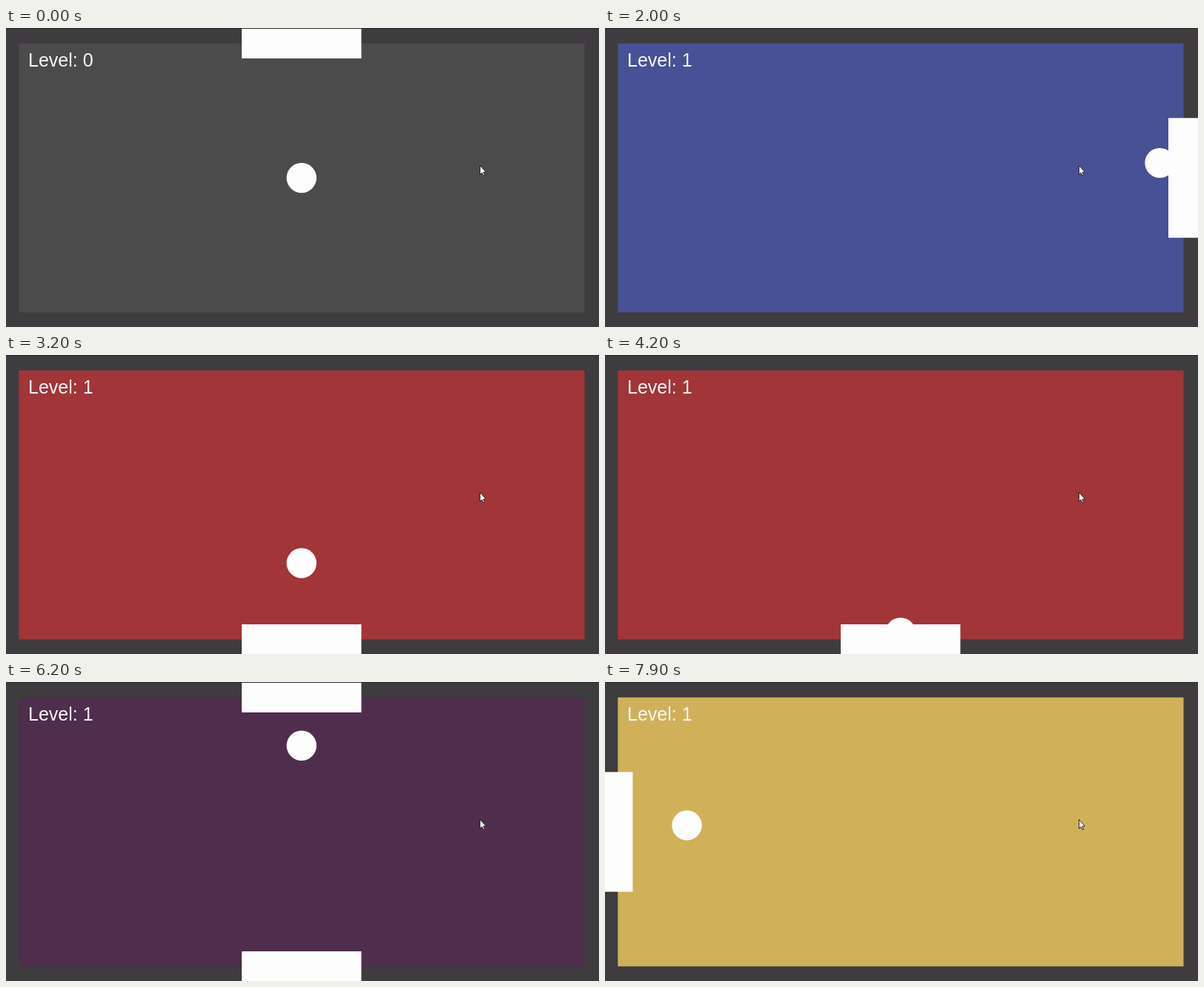
An HTML page with a canvas for the animation above (8000 ms loop, 800 by 403 pixels).

```html
<!DOCTYPE html>
<html lang="en">
<head>
<meta charset="utf-8">
<title>Rooms</title>
<style>
html, body { margin: 0; width: 100%; height: 100%; overflow: hidden; background: #3f3c3f; }
canvas { display: block; }
</style>
</head>
<body>
<canvas id="stage" width="800" height="403"></canvas>
<script>
const ctx = document.getElementById('stage').getContext('2d');
const LOOP = 8000;
const SPEED = 0.42; // px per ms
const CENTER = { x: 398.7, y: 202 };
const WALL = '#3f3c3f', WHITE = '#fdfdfd', GOLD = '#d0b15a';

// Unit steps: up, down, left, right
const STEP = { U: [0, -1], D: [0, 1], L: [-1, 0], R: [1, 0] };

// Keys read as "directions + ms"; a bare number is a pause.
// The ball enters beside the door named by "from", or at the centre.
const rooms = [
  { color: '#4b4b4b', doors: 'U', keys: '30 U420' },
  { color: '#485096', doors: 'R', keys: '718 UR48 R849' },
  { color: GOLD, doors: 'UDLR', from: 'L', keys: 'R610 UR160 U260' },
  { color: '#a13538', doors: 'D', from: 'D', keys: 'U388 213 D521' },
  { color: GOLD, doors: 'UDLR', from: 'U', keys: 'D714' },
  { color: '#4f2d4c', doors: 'UD', from: 'U', keys: 'D643 U771' },
  { color: GOLD, doors: 'UDLR', from: 'D', keys: '15 R221 UR269 R395' },
  { color: GOLD, doors: 'L', from: 'L', keys: 'R55 UR21 R294 L385' }
];

let clock = 0;
rooms.forEach((room, i) => {
  room.level = Math.min(i, 1);
  room.start = clock;
  room.moves = room.keys.split(' ').map(key => {
    const [, dirs, ms] = key.match(/(\D*)(\d+)/);
    clock += +ms;
    return { dirs, ms: +ms };
  });
});

function ballAt(room, t) {
  const [ex, ey] = STEP[room.from] || [0, 0];
  let x = CENTER.x + ex * 323.5;
  let y = CENTER.y + ey * 123;
  let left = t - room.start;
  for (const { dirs, ms } of room.moves) {
    const dist = SPEED * Math.min(left, ms);
    for (const d of dirs) {
      x += STEP[d][0] * dist;
      y += STEP[d][1] * dist;
    }
    left -= ms;
    if (left <= 0) break;
  }
  return [x, y];
}

function box(color, x, y, w, h) {
  ctx.fillStyle = color;
  ctx.fillRect(x, y, w, h);
}

// Doors reach from just inside the field to beyond the stage
function drawDoor(side) {
  const [dx, dy] = STEP[side];
  const long = 161.4, deep = 60;
  const w = dx ? deep : long, h = dy ? deep : long;
  const x = CENTER.x + dx * (361.3 + deep / 2);
  const y = CENTER.y + dy * (161 + deep / 2);
  box(WHITE, x - w / 2, y - h / 2, w, h);
}

function drawCursor(x, y) {
  ctx.beginPath();
  const outline = [[0, 0], [0, 12], [2.6, 9.6], [4.4, 13.6], [6.2, 12.8], [4.5, 8.9], [7.8, 8.6]];
  outline.forEach(([dx, dy]) => ctx.lineTo(x + dx, y + dy));
  ctx.closePath();
  ctx.strokeStyle = '#262626';
  ctx.fillStyle = '#fff';
  ctx.fill();
  ctx.stroke();
}

function draw(t) {
  const room = rooms.filter(r => r.start <= t).pop();
  box(WALL, 0, 0, 800, 403);
  box(room.color, 17.3, 20.8, 763.2, 362.5);
  for (const side of room.doors) drawDoor(side);
  box('#2b292b', 0, 0, 800, 1);

  ctx.fillStyle = '#f8f8f8';
  ctx.font = '25px "Liberation Sans", Arial, sans-serif';
  ctx.fillText('Level: ' + room.level, 30, 51.6);

  ctx.fillStyle = WHITE;
  ctx.beginPath();
  ctx.arc(...ballAt(room, t), 20.2, 0, Math.PI * 2);
  ctx.fill();

  drawCursor(639.5, 185.5);
}

const begin = performance.now();
function tick() {
  draw((performance.now() - begin) % LOOP);
  requestAnimationFrame(tick);
}
tick();
</script>
</body>
</html>
```
